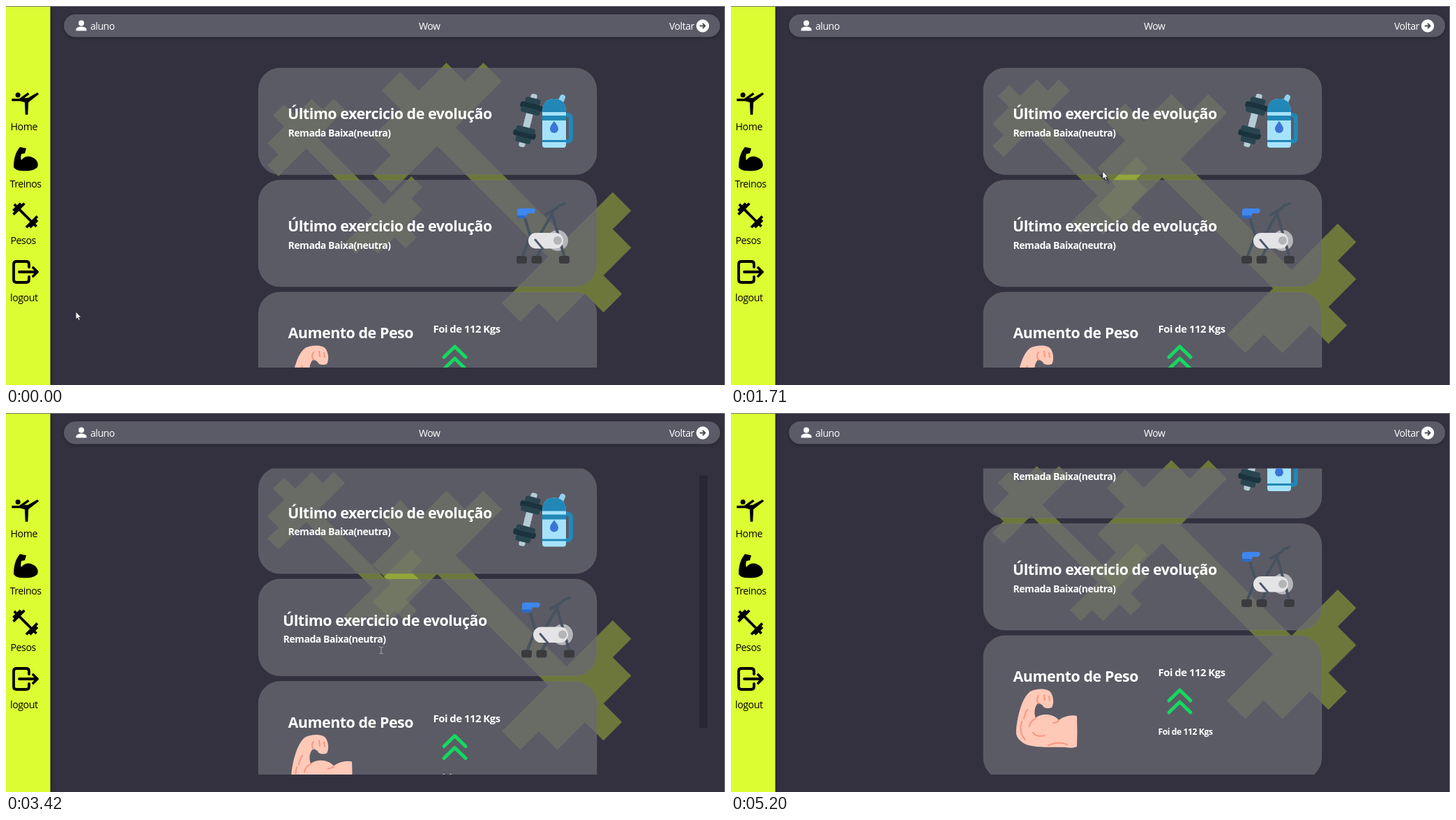
Animation, 1031 px wide and 543 px high, one loop 5.3 s. Source, as an HTML page:

```html
<!DOCTYPE html>
<html lang="pt">
<head>
<meta charset="utf-8">
<style>
html, body { margin: 0; height: 100%; overflow: hidden; background: #333140; }
svg { display: block; font-family: "Open Sans", "Noto Sans", sans-serif; letter-spacing: -.028em; }
.card > rect { fill: rgb(104 104 115 / .76); stroke: #77787a; stroke-opacity: .35; }
.card text { fill: #fff; font-weight: 700; }
.title { font-size: 21.4px; }
.sub { font-size: 14px; }
.menu { font-size: 14.2px; }
.bar text { font-size: 14px; fill: #fff; }
.bar rect { filter: drop-shadow(0 1px 2px #0005); }
.line { fill: none; stroke-linecap: round; stroke-linejoin: round; }
</style>
</head>
<body>
<svg width="1031" height="543" viewBox="0 0 1031 543">
  <defs>
    <clipPath id="view"><rect x="340" y="79.5" width="530" height="438.5"/></clipPath>
    <path id="barbell"/>
    <g id="weight">
      <rect x="-4.5" y="-39" width="9" height="12" rx="3" fill="#b4ccd6"/>
      <rect x="-5" y="-12" width="10" height="13" fill="#b4ccd6"/>
      <rect x="-11" y="-33" width="22" height="9" rx="3" fill="#28454f"/>
      <rect x="-16.5" y="-25" width="33" height="9" rx="3.5" fill="#1b333d"/>
      <rect x="-14" y="-18" width="28" height="8" rx="3" fill="#28454f"/>
    </g>
  </defs>

  <g fill="#dbff33" fill-opacity=".34">
    <use id="small" href="#barbell"/>
    <use id="big" href="#barbell"/>
  </g>

  <g clip-path="url(#view)">
    <g class="card">
      <rect x="362" y="89" width="485" rx="31"/>
      <g class="body">
        <text class="title" x="404" y="162">Último exercicio de evolução</text>
        <text class="sub" x="404.5" y="186.5">Remada Baixa(neutra)</text>
      </g>
      <g class="icon">
        <g transform="translate(748.5 164) rotate(14)">
          <use href="#weight"/><use href="#weight" transform="scale(1 -1)"/>
        </g>
        <path class="line" d="M794 140L798 131" stroke="#8fd3f0" stroke-width="8"/>
        <path class="line" d="M800 156h5q5 0 5 6v26q0 6-6 6h-4" stroke="#2188b8" stroke-width="6"/>
        <path d="M769 153q0-20 17-20t17 20v46q0 4-4 4h-26q-4 0-4-4z" fill="#a5e3fb"/>
        <path d="M769 152q0-19 17-19t17 19zM769 157h34v7h-34zM769 192h34v3h-34z" fill="#2188b8"/>
        <path d="M786 165q6 7 6 11a6 6 0 0 1-12 0q0-4 6-11z" fill="#3b74d6"/>
      </g>
    </g>

    <g class="card">
      <rect x="362" y="249.5" width="485" rx="31"/>
      <g class="body">
        <text class="title" x="404" y="323">Último exercicio de evolução</text>
        <text class="sub" x="404.5" y="347.5">Remada Baixa(neutra)</text>
      </g>
      <g class="icon">
        <circle cx="791" cy="336" r="15" fill="#b5b6ba"/>
        <path class="line" d="M744 303L752 330 740 360M757 343L784 296M782 294L801 360M770 342L761 360M774 299L788 291 793 286 801 283" stroke="#465360" stroke-width="4"/>
        <path d="M733 293q0-3 4-3h18q4 0 4 3l-2 4h-9l-3 7h-12z" fill="#3d87ee"/>
        <path d="M733 300h13l-2 4h-11z" fill="#2b69c4"/>
        <rect x="749" y="325" width="50" height="22.5" rx="11" fill="#e4e4e7"/>
        <circle cx="791" cy="336" r="6" fill="#b3b4b8"/>
        <path class="line" d="M759 335L770 348" stroke="#4d5965" stroke-width="3"/>
        <g fill="#3b3b3f">
          <rect x="732" y="358" width="15" height="11" rx="3"/>
          <rect x="753.5" y="358" width="15" height="11" rx="3"/>
          <rect x="793" y="358" width="15" height="11" rx="3"/>
        </g>
      </g>
    </g>

    <g class="card">
      <rect x="362" y="319" width="485" rx="31"/>
      <g class="body">
        <text class="title" x="404.5" y="385">Aumento de Peso</text>
        <text x="612.5" y="377" font-size="14.8">Foi de 112 Kgs</text>
        <text x="612.5" y="461.3" font-size="12.2">Foi de 112 Kgs</text>
        <path class="line" d="M628 412L643.5 397 659 412M628 429L643.5 414 659 429" stroke="#14d95f" stroke-width="5"/>
        <path d="M409 453C411 434 417 408 429 399 438 394 455 394 459 401 463 408 463 417 460 422 455 424 448 423 447 419L441 415C435 420 434 430 437 437 444 430 462 430 470 440 478 434 488 432 496 434Q497 455 496 478 490 481 480 479C460 478 430 481 418 472Q407 465 409 453z" fill="#ffc9b8"/>
        <path class="line" d="M437 437Q428 443 428 449M417 442Q412 458 422 468M433 458Q438 465 450 462M470 441Q465 444 462 444M441 405Q437 411 441 416M449 404L450 411M456 406L457 412M425 425Q420 434 420 438M455 476Q470 470 482 475" stroke="#f59c85" stroke-width="2.2"/>
      </g>
    </g>
  </g>

  <rect id="thumb" x="994" width="12" height="362" fill="#292733"/>

  <g class="bar">
    <rect x="83" y="12" width="941" height="32.5" rx="16.25" fill="#5b5b68"/>
    <g fill="#fff">
      <circle cx="108" cy="24.5" r="4"/>
      <path d="M100.5 35.5v-2c0-2.7 5-4 7.5-4s7.5 1.3 7.5 4v2z"/>
      <circle cx="999" cy="28.5" r="9.2"/>
    </g>
    <path class="line" d="M995.5 28.5h6M999.5 25.5l3 3-3 3" stroke="#4a4956" stroke-width="1.8"/>
    <text x="121" y="34">aluno</text>
    <text x="592" y="34">Wow</text>
    <text x="951" y="34">Voltar</text>
  </g>

  <rect width="63.5" height="543" fill="#dcfd32" style="filter:drop-shadow(1px 0 2px #0006)"/>
  <g class="menu">
    <path transform="translate(6.5 116.8) scale(1.77)" d="M4 6a2 2 0 1 1 4 0a2 2 0 1 1-4 0zM1 9h6l7-5 1.31 1.52L11.14 8.5H14L21.8 4 23 5.4 14.5 12 14 22h-2l-.5-10L8 11H1z"/>
    <path d="M20 202l9 2-2 7-5 1c-1 4-1 6 0 9 3-5 10-7 16-4 7 3 9 9 7 14-5 5-15 6-22 5-6 0-10-2-12-5 0-10 2-21 9-29z"/>
    <use href="#barbell" transform="translate(27.7 300) scale(2.65)"/>
    <path class="line" stroke="#000" stroke-width="3.8" d="M33 374v-4q0-4-4-4H15q-4 0-4 4v22q0 4 4 4h14q4 0 4-4v-4M19 381H45M39 375l6 6-6 6"/>
    <text x="6.5" y="178">Home</text>
    <text x="5.5" y="260">Treinos</text>
    <text x="6.5" y="340.5">Pesos</text>
    <text x="6" y="422.5">logout</text>
  </g>
  <path d="M0 0H1031V543h-1V1H0z" fill="#77777f"/>

  <path id="arrow" d="M0 0V11L2.5 8.7 4.3 12.5 6 11.7 4.3 8H7.5z" fill="#fff" stroke="#222" stroke-width=".7"/>
  <path id="beam" class="line" d="M-2.5-5Q0-5 0-3.5V3.5Q0 5-2.5 5M2.5-5Q0-5 0-3.5M0 3.5Q0 5 2.5 5" stroke="#a9a9ae"/>
</svg>
<script>
const LOOP = 5300;
const $ = id => document.getElementById(id);
const move = (el, x, y, more = '') => el.setAttribute('transform', `translate(${x} ${y}) ${more}`);
const show = (el, on) => el.style.display = on ? '' : 'none';

// Half of the barbell outline; the other half is its point reflection.
const half = [[3.5, 2.5], [6, 0], [7, 1], [6, 2], [7, 3], [5.5, 4.5], [6.5, 5.5],
  [5.5, 6.5], [4.5, 5.5], [3, 7], [2, 6], [1, 7], [0, 6], [2.5, 3.5]];
$('barbell').setAttribute('d', 'M' + [...half, ...half.map(([x, y]) => [-x, -y])].join('L') + 'z');

const cards = [...document.querySelectorAll('.card')].map((el, i) => ({
  el, base: [89, 249.5, 319][i], height: [152.5, 152.5, 206][i],
  box: el.querySelector('rect'), body: el.querySelector('.body'), icon: el.querySelector('.icon')
}));

// Card index, pointer enters, pointer leaves
const hovers = [[0, 1070, 1690], [0, 1780, 2400], [1, 2470, 3600], [2, 3610, 4720]];
// Time, x, y
const pointer = [[0, 100, 438], [570, 172, 395], [930, 366, 214], [1300, 480, 190],
  [1650, 530, 225], [1710, 533, 237], [2000, 534, 205], [2350, 534, 238], [2580, 535, 337],
  [3420, 538, 340], [3560, 538, 340], [3720, 624, 394], [4450, 640, 410], [4700, 800, 470],
  [5000, 992, 545], [LOOP, 992, 560]];
const scrolling = [[0, 0], [3330, 0], [3420, 11], [3600, 91], [LOOP, 91]];

function along(keys, t) {
  const i = Math.max(1, keys.findIndex(k => k[0] >= t));
  const [a, b] = [keys[i - 1], keys[i]];
  const p = (t - a[0]) / (b[0] - a[0]);
  return a.slice(1).map((v, j) => v + (b[j + 1] - v) * p);
}

// Padding lost by a hovered card: eases in, snaps back.
function squeeze(card, t) {
  const hover = hovers.find(([c, from, to]) => c === card && t >= from && t < to);
  return hover ? 7 * (1 - (1 - Math.min(1, (t - hover[1]) / 500)) ** 2) : 0;
}

function draw(t) {
  const x = Math.abs(t - 2300);
  move($('big'), 711, 329.3 - .03057 * x + 1.47e-6 * x * x, 'scale(26.5)');
  move($('small'), 486, 244 - 57 * Math.sin(Math.PI * t / (2 * LOOP)), 'scale(15.86)');

  const [scroll] = along(scrolling, t);
  let top = 89 - scroll;
  cards.forEach((card, i) => {
    const p = squeeze(i, t), height = card.height - 2 * p;
    move(card.el, 0, top - card.base);
    card.box.setAttribute('height', height);
    move(card.body, -p, -p);
    if (card.icon) move(card.icon, p, -p);
    top += height + 8;
  });

  $('thumb').setAttribute('y', 80 + scroll * .82);
  show($('thumb'), t >= 3400 && t < 3840);

  const [px, py] = along(pointer, t), typing = t > 2500 && t < 3570;
  move($('arrow'), px, py);
  move($('beam'), px, py);
  show($('arrow'), !typing);
  show($('beam'), typing);
}

function tick(now) {
  draw(now % LOOP);
  requestAnimationFrame(tick);
}
requestAnimationFrame(tick);
</script>
</body>
</html>
```
